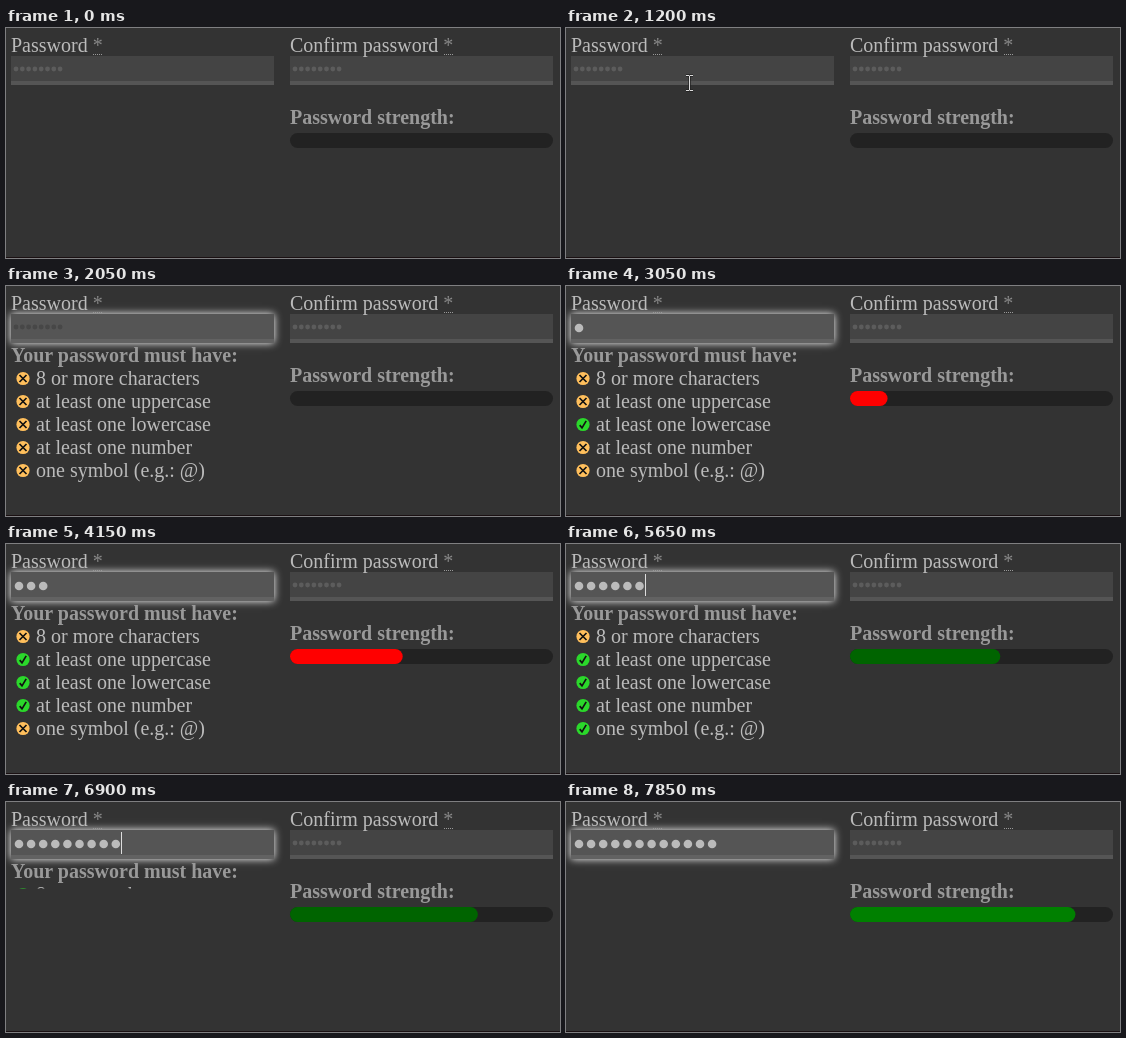
An HTML page for the animation above (8000 ms loop, 554 by 230 pixels).

```html
<!DOCTYPE html>
<html lang="en">
<head>
<meta charset="utf-8">
<title>Password strength</title>
<style>
  html, body { margin: 0; width: 100%; height: 100%; overflow: hidden; background: #333; }
  #stage { position: absolute; left: 0; top: 0; width: 554px; height: 230px; overflow: hidden; }
  .field { position: absolute; top: 28px; width: 263px; height: 25px; background: #444; border-bottom: 4px solid #555; }
  #first { left: 5px; }
  #second { left: 284px; }
  #glow { position: absolute; left: 5px; top: 28px; width: 263px; height: 25px; opacity: 0;
          background: #555; border-bottom: 4px solid #626262; box-shadow: 0 0 8px #fff; }
  svg { position: absolute; left: 0; top: 0; }
  text { font: 20px "Liberation Serif", "Times New Roman", serif; fill: #bbb; }
  .title { font-weight: bold; fill: #999; }
  .star { fill: #888; }
</style>
</head>
<body>
<div id="stage">
  <div class="field" id="first"></div>
  <div class="field" id="second"></div>
  <div id="glow"></div>
  <svg width="554" height="230" viewBox="0 0 554 230">
    <defs><clipPath id="fold"><rect id="foldRect" x="0" y="59" width="280" height="0"/></clipPath></defs>
    <rect y="229" width="554" height="1" fill="#1a1012"/>
    <text x="5" y="24">Password <tspan class="star">*</tspan></text>
    <text x="284" y="24">Confirm password <tspan class="star">*</tspan></text>
    <path d="M87 26.5h9M438 26.5h9" stroke="#999" stroke-dasharray="1 1"/>
    <g id="hintA"></g>
    <g id="hintB" fill="#5c5c5c"></g>
    <g id="typed" fill="#bbb"></g>
    <rect id="caret" y="30" width="1" height="22" fill="#ddd"/>
    <text class="title" x="284" y="96">Password strength:</text>
    <rect x="284" y="105" width="263" height="15" rx="7.5" fill="#222"/>
    <rect id="bar" x="284" y="105" height="15" rx="7.5"/>
    <g id="rules" clip-path="url(#fold)">
      <text class="title" x="5" y="76">Your password must have:</text>
    </g>
    <path id="arrow" d="M0 0v16l4-4 3 6 2-1-3-6h5z" fill="#fff" stroke="#000"/>
    <g id="beam" fill="none">
      <path d="M-3.5-7.5h3l.5.5.5-.5h3M0-7V7M-3.5 7.5h3L0 7l.5.5h3" stroke="#222" stroke-width="2.4"/>
      <path d="M-3.5-7.5h3l.5.5.5-.5h3M0-7V7M-3.5 7.5h3L0 7l.5.5h3" stroke="#ddd"/>
    </g>
  </svg>
</div>
<script>
const LOOP = 8000, STEP = 50, FOCUS = 1300;
const LIST_HEIGHT = 137, CELL = 12.1;
const keys = [2600, 3250, 3850, 4600, 5250, 5650, 6000, 6350, 6850, 7150, 7400, 7700];
const blinks = [2050, 2550, 3050, 3600, 4150, 4650, 5200, 5750, 6250, 6800, 7350, 7850];
// Key count that satisfies each rule, and key counts that raise the strength bar.
const rules = [
  ["8 or more characters", 8],
  ["at least one uppercase", 2],
  ["at least one lowercase", 1],
  ["at least one number", 3],
  ["one symbol (e.g.: @)", 4]
];
const raises = [1, 2, 3, 4, 8, 12];
const barColors = ["red", "red", "red", "#006400", "#006400", "#008000"];
const path = [[800, 0, 182], [1200, 123, 55], [1300, 112, 25], [1400, 112, 25], [1450, 112, 19]];

const $ = id => document.getElementById(id);
const clamp = v => Math.max(0, Math.min(1, v));
const swing = p => 0.5 - Math.cos(Math.PI * clamp(p)) / 2;

function add(parent, tag, attrs, text = "") {
  const el = document.createElementNS("http://www.w3.org/2000/svg", tag);
  for (const name in attrs) el.setAttribute(name, attrs[name]);
  el.textContent = text;
  return parent.appendChild(el);
}

function show(el, visible) {
  el.style.display = visible ? "" : "none";
}

function addDots(parent, count, x, gap, y, r) {
  return Array.from({ length: count }, (_, i) => add(parent, "circle", { cx: x + gap * i, cy: y, r }));
}

addDots($("hintA"), 8, 10, 6.3, 41, 2.4);
addDots($("hintB"), 8, 289, 6.3, 41, 2.4);
const dots = addDots($("typed"), keys.length, 13, CELL, 42, 4.3);

const marks = rules.map(([label, need], i) => {
  const y = 92.5 + 23 * i;
  add($("rules"), "text", { x: 30, y: y + 6.5 }, label);
  const disc = add($("rules"), "circle", { cx: 17, cy: y, r: 6.6 });
  const sign = add($("rules"), "path", { transform: `translate(17 ${y})`, fill: "none", stroke: "#111", "stroke-width": 1.7 });
  return { need, disc, sign };
});

const caretEvents = [[FOCUS, true], ...keys.map(k => [k, true]), ...blinks.map(b => [b, false])]
  .sort((a, b) => a[0] - b[0]);

function caretOn(t) {
  let on = false;
  for (const [time, force] of caretEvents) {
    if (time > t) break;
    on = force || !on;
  }
  return on;
}

function pointerAt(t) {
  const i = path.findIndex(p => p[0] > t);
  if (i < 0) return path[path.length - 1].slice(1);
  const [t0, x0, y0] = path[i - 1], [t1, x1, y1] = path[i];
  const p = (t - t0) / (t1 - t0);
  const e = i === 1 ? 1 - (1 - p) ** 1.6 : p;
  return [x0 + (x1 - x0) * e, y0 + (y1 - y0) * e];
}

function drawPointer(t) {
  const visible = t >= 800 && t < 1500;
  const overField = t >= 1200;
  show($("arrow"), visible && !overField);
  show($("beam"), visible && overField);
  if (!visible) return;
  const [x, y] = pointerAt(t).map(Math.round);
  $("arrow").setAttribute("transform", `translate(${x + 0.5} ${y + 0.5})`);
  $("beam").setAttribute("transform", `translate(${x + 0.5} ${y})`);
}

function draw(t) {
  const count = keys.filter(k => k <= t).length;
  const level = raises.filter(n => n <= count).length;

  $("glow").style.opacity = clamp((t - 1200) / 100);
  $("hintA").setAttribute("fill", t < FOCUS ? "#5c5c5c" : "#474747");
  show($("hintA"), count === 0);
  dots.forEach((dot, i) => show(dot, i < count));
  show($("caret"), caretOn(t));
  $("caret").setAttribute("x", Math.floor(7 + CELL * count));

  show($("bar"), level > 0);
  $("bar").setAttribute("width", level * 263 / 7);
  $("bar").setAttribute("fill", barColors[level - 1] || "none");

  for (const { need, disc, sign } of marks) {
    const ok = count >= need;
    disc.setAttribute("fill", ok ? "#2bd82b" : "#ffbf5c");
    sign.setAttribute("d", ok ? "M-3.3 .6L-1 3.4 3.2-3.6" : "M-3.5-3.5l7 7M3.5-3.5l-7 7");
  }

  const open = swing((t - 1430) / 540) - swing((t - 6520) / 540);
  $("foldRect").setAttribute("height", Math.max(0, LIST_HEIGHT * open));
  drawPointer(t);
}

const start = performance.now();
function tick() {
  const t = (performance.now() - start) % LOOP;
  draw(Math.floor(t / STEP) * STEP);
  requestAnimationFrame(tick);
}
tick();
</script>
</body>
</html>
```
